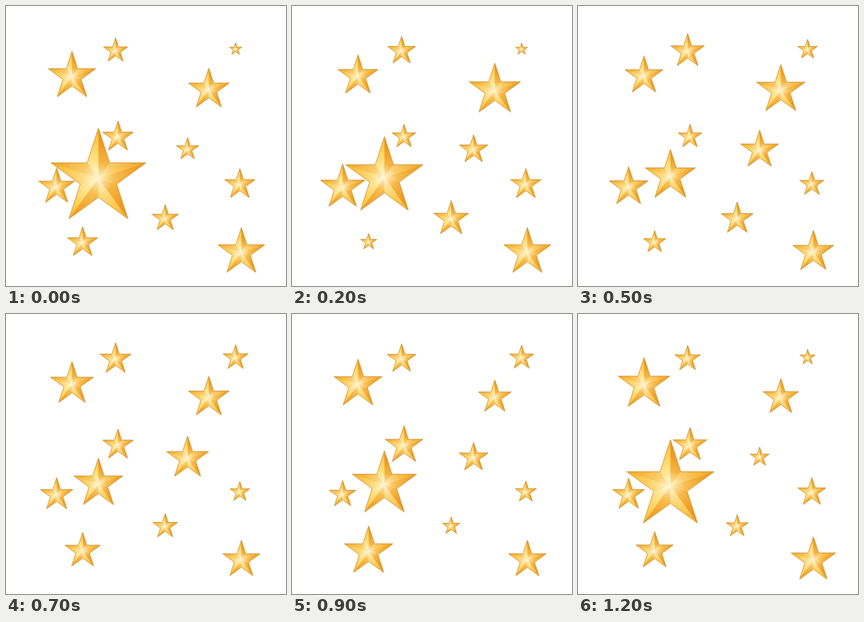
These frames come from a looping animation (350 px wide and 350 px high, 1.3 s). An HTML page with a canvas:

```html
<!DOCTYPE html>
<html lang="en">
<head>
<meta charset="utf-8">
<title>Twinkling stars</title>
<style>
html, body { margin: 0; width: 100%; height: 100%; overflow: hidden; background: #fff; }
canvas { display: block; }
</style>
</head>
<body>
<canvas id="stage" width="350" height="350"></canvas>
<script>
const ctx = document.getElementById('stage').getContext('2d');
const STEP = 100, STEPS = 13;

// Each star grows and shrinks at an even pace: [x, y, [step, largest radius], [step, smallest radius]]
const STARS = [
  [82.5, 85, [11.3, 35.5], [3.6, 22.5]],
  [137, 54.5, [5, 22], [0, 16]],
  [287, 53.3, [7.9, 18], [1, 6]],
  [253.5, 102, [3, 37], [10.4, 18]],
  [140, 162, [10, 27], [3.5, 12]],
  [227, 177.8, [6.8, 28.5], [11, 10.5]],
  [63.3, 224, [2.5, 30.5], [10, 15.5]],
  [292.3, 221.3, [1, 21.5], [7.7, 12]],
  [199, 264, [3, 25.7], [10, 9]],
  [95.8, 294, [9.7, 35], [3, 6]],
  [294.2, 305, [1, 32.3], [8, 23]],
  [115.5, 209.3, [0, 62.5], [6, 27]]
];

const wrap = t => (t + STEPS) % STEPS;

function radiusAt(step, [peak, max], [low, min]) {
  const fall = wrap(low - peak), since = wrap(step - peak);
  const size = since < fall ? 1 - since / fall : (since - fall) / (STEPS - fall);
  return min + (max - min) * size;
}

function radial(...colors) {
  const g = ctx.createRadialGradient(0, 0, 0, 0, 0, 1);
  [0, 0.32, 0.65, 1].forEach((at, i) => g.addColorStop(at, colors[i]));
  return g;
}
const LIGHT = radial('#fffae4', '#ffe694', '#ffd358', '#f9b930');
const DARK = radial('#fff0c0', '#f6b440', '#ee9c26', '#e38b1c');

// Ten corners, clockwise from the top tip
const corners = Array.from({ length: 10 }, (_, i) => {
  const r = i % 2 ? 0.382 : 1, a = i * Math.PI / 5;
  return [r * Math.sin(a), -r * Math.cos(a)];
});

function trace(points) {
  ctx.beginPath();
  points.forEach(p => ctx.lineTo(...p));
  ctx.closePath();
}

function drawStar(x, y, r) {
  ctx.save();
  ctx.translate(x, y + r * 0.0955);
  ctx.scale(r, r);
  trace(corners);
  ctx.fillStyle = LIGHT;
  ctx.fill();

  // Light comes from the left: the more a facet faces right, the darker it is
  ctx.fillStyle = DARK;
  corners.forEach((a, i) => {
    const b = corners[(i + 1) % 10], dx = b[0] - a[0], dy = b[1] - a[1];
    ctx.globalAlpha = (1 + dy / Math.hypot(dx, dy)) / 2;
    trace([[0, 0], a, b]);
    ctx.fill();
  });

  ctx.globalAlpha = 1;
  trace(corners);
  ctx.lineWidth = 0.7 / r;
  ctx.strokeStyle = '#cb8728';
  ctx.stroke();
  ctx.restore();
}

function draw(now) {
  const step = Math.floor(now / STEP) % STEPS;
  ctx.fillStyle = '#fff';
  ctx.fillRect(0, 0, 350, 350);
  for (const [x, y, largest, smallest] of STARS) drawStar(x, y, radiusAt(step, largest, smallest));
}

const start = performance.now();
function tick() {
  draw(performance.now() - start);
  requestAnimationFrame(tick);
}
tick();
</script>
</body>
</html>
```
